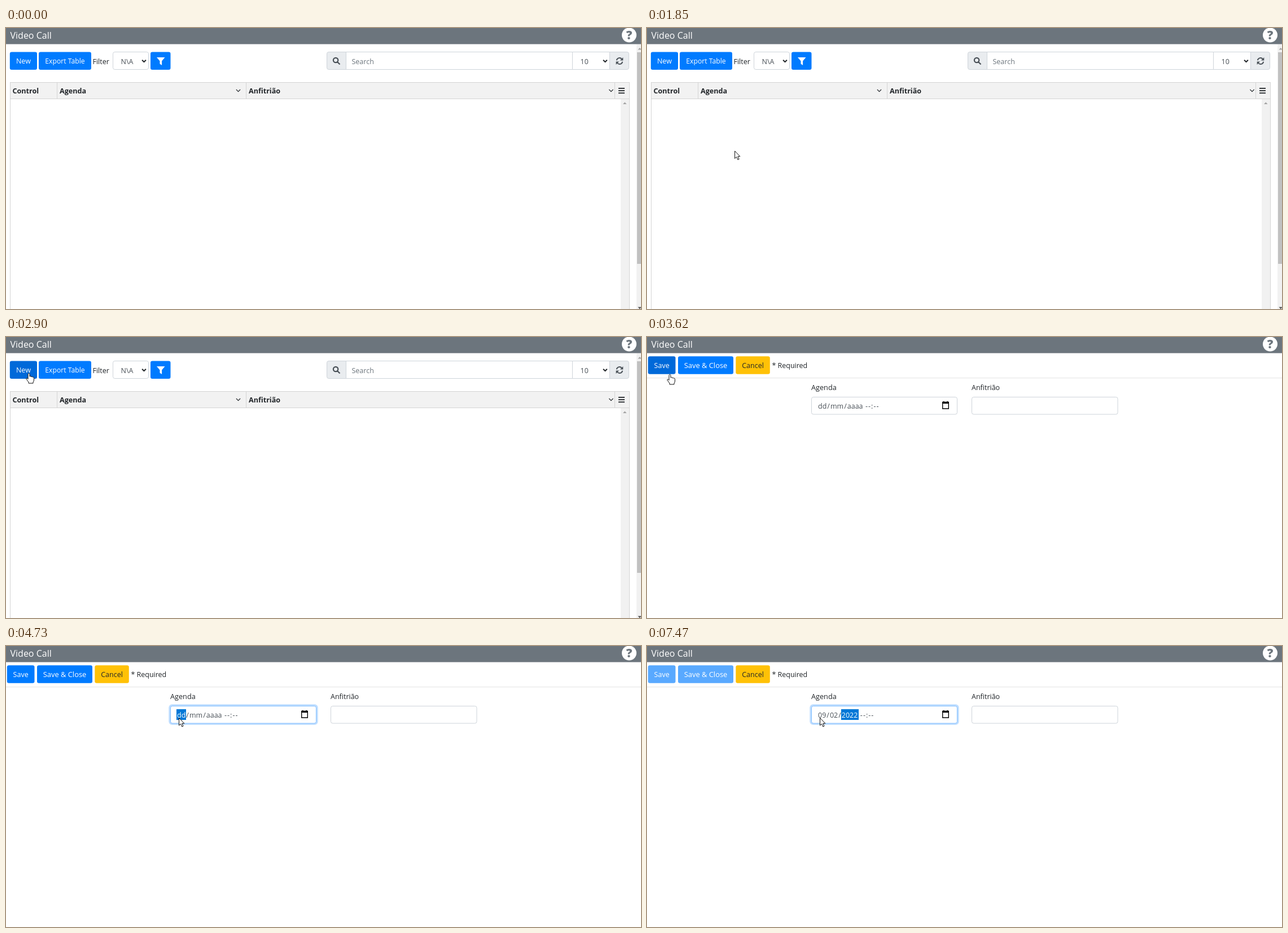
Recreate the animation shown at these times as an HTML page with a canvas. Size 1125 by 498 pixels, loop 8000 ms.

```html
<!DOCTYPE html>
<html lang="en">
<head>
<meta charset="utf-8">
<title>Video Call</title>
<style>
  html, body { margin: 0; width: 100%; height: 100%; overflow: hidden; background: #fff; }
  canvas { display: block; }
</style>
</head>
<body>
<canvas id="stage" width="1125" height="498"></canvas>
<script>
const ctx = document.getElementById('stage').getContext('2d');
const LOOP = 8000, STEP = 70;
const BLUE = [0, 123, 255], BLUE_HOVER = [0, 105, 217], WHITE = [255, 255, 255];
const INK = '#212529', GREY = '#495057', BORDER = '#ced4da', ADDON = '#e9ecef';
const FORM_OPENS = 3030;

const clamp = v => Math.max(0, Math.min(1, v));
const lerp = (a, b, u) => a + (b - a) * u;
const blend = (a, b, u) => a.map((v, i) => lerp(v, b[i], u));
const rgb = color => `rgb(${color.map(Math.round)})`;
const progress = (t, start, end) =>
  clamp(Math.floor((t - start) / STEP + 1e-6) * STEP / (end - start));

function font(size = 12.5, weight = 400) {
  ctx.font = `${weight} ${size}px "Open Sans", "Noto Sans", sans-serif`;
}

function text(str, x, y, color = INK, size, weight) {
  font(size, weight);
  ctx.fillStyle = color;
  ctx.fillText(str, x, y);
}

function rect(x, y, w, h, color) {
  ctx.fillStyle = color;
  ctx.fillRect(x, y, w, h);
}

function box(x, y, w, h, fill, border, radius = 3.3) {
  ctx.beginPath();
  ctx.roundRect(x, y, w, h, radius);
  ctx.fillStyle = fill;
  ctx.fill();
  if (border) {
    ctx.strokeStyle = border;
    ctx.lineWidth = 1;
    ctx.stroke();
  }
}

function path(d, { fill, stroke, width = 1, x = 0, y = 0 }) {
  const shape = new Path2D(d);
  ctx.save();
  ctx.translate(x, y);
  if (fill) { ctx.fillStyle = fill; ctx.fill(shape); }
  if (stroke) { ctx.strokeStyle = stroke; ctx.lineWidth = width; ctx.stroke(shape); }
  ctx.restore();
}

const chevron = (x, y, r, width) =>
  path(`M${-r} ${-r / 2}L0 ${r / 2}L${r} ${-r / 2}`, { x, y, stroke: INK, width });

function button(label, x, y, w, fill, color = '#fff', size) {
  box(x, y, w, 31.6, fill);
  font(size);
  text(label, x + (w - ctx.measureText(label).width) / 2, Math.round(y + 20.8), color, size);
}

function drawHeader() {
  rect(0, 0, 1125, 28.6, '#6c757d');
  text('Video Call', 7.5, 19, '#fff', 16);
  ctx.beginPath();
  ctx.arc(1104, 12.5, 13, 0, 7);
  ctx.fillStyle = '#fff';
  ctx.fill();
  text('?', 1098.8, 20, '#6c757d', 21, 800);
}

function drawToolbar(hover) {
  button('New', 6.8, 42.5, 48.2, rgb(blend(BLUE, BLUE_HOVER, hover)));
  button('Export Table', 58, 42.5, 93, rgb(BLUE), '#fff', 12.2);
  text('Filter', 153.5, 64);
  box(189.5, 42.5, 63, 31, '#fff', BORDER);
  text('N\\A', 203.5, 64, GREY);
  chevron(244.5, 58.5, 3.4, 2);
  box(256, 42.5, 35.5, 31.6, rgb(BLUE));
  path('M267 52h14.5l-5.4 6.6v7.4l-3.6-2.6v-4.8z', { fill: '#fff' });

  box(568.5, 42.5, 535, 31, ADDON, BORDER);
  box(602.5, 42.5, 401, 31, '#fff', BORDER, 0);
  box(1003.5, 42.5, 66, 31, '#fff', BORDER, 0);
  path('M588.3 57a4.2 4.2 0 1 0-8.4 0a4.2 4.2 0 1 0 8.4 0M587 60l4.5 4.5',
    { stroke: GREY, width: 2.2 });
  text('Search', 612.5, 64, '#6c757d');
  text('10', 1017.5, 64, GREY);
  chevron(1061.5, 58.5, 3.4, 2);
  path('M1081.8 57.2A5.2 5.2 0 0 1 1091 55M1092.2 59.8A5.2 5.2 0 0 1 1083 62',
    { stroke: GREY, width: 1.9 });
  path('M1093.3 52v5.4h-5.4zM1080.7 65v-5.4h5.4z', { fill: GREY });
}

function drawTable() {
  const line = '#d4d4d4';
  rect(7, 96, 1098, 30, '#f2f2f2');
  rect(1089, 126, 15, 372, '#f1f1f1');
  rect(7, 96, 1098, 1, line);
  rect(7, 125, 1098, 1, line);
  for (const x of [7, 1104]) rect(x, 96, 1, 402, line);
  for (const x of [90, 425, 1078]) rect(x, 96, 1, 30, line);
  text('Control', 11.5, 116, INK, 12.6, 700);
  text('Agenda', 95, 116, INK, 12.6, 700);
  text('Anfitrião', 430, 116, INK, 12.6, 700);
  chevron(411.5, 110.8, 3.6, 1.1);
  chevron(1072, 110.8, 3.6, 1.1);
  for (let i = 0; i < 3; i++) rect(1085, 106 + i * 4.2, 11, 1.8, INK);
  path('M1093 135l3.3-3.6l3.3 3.6z', { fill: '#a3a3a3' });

  rect(1117, 29, 8, 469, '#f1f1f1');
  rect(1118, 43, 7, 375, '#c1c1c1');
  path('M1119.5 38.5l3.2-3.6l3.2 3.6z', { fill: '#a3a3a3' });
  path('M1119.5 494.5l3.2 3.6l3.2-3.6z', { fill: '#505050' });
}

function dateParts(t) {
  const years = [[7470, '2022'], [7320, '0202'], [7060, '0020'], [6670, '0002'], [0, 'aaaa']];
  return {
    day: t < 5790 ? 'dd' : '09',
    month: t < 6210 ? 'mm' : '02',
    year: years.find(([start]) => t >= start)[1],
    selected: t < 4530 ? '' : t < 5790 ? 'day' : t < 6210 ? 'month' : 'year',
  };
}

function drawDate(t) {
  const { selected, ...parts } = dateParts(t);
  let x = 303;
  const put = (str, active) => {
    font();
    const w = ctx.measureText(str).width;
    if (active) rect(Math.round(x - 1), 112, Math.round(w + 2), 19, '#0078d7');
    text(str, x, 127, active ? '#fff' : GREY);
    x += w + 1;
  };
  for (const name in parts) {
    put(parts[name], name === selected);
    if (name !== 'year') put('/');
  }
  x += 3.5;
  ctx.letterSpacing = '1px';
  put('--:--');
  ctx.letterSpacing = '0px';
}

function drawForm(t, hover) {
  const disabled = t < 5790 ? 0 : t < 5880 ? 0.18 : 0.35;
  const save = blend(BLUE, BLUE_HOVER, hover);
  button('Save', 1.8, 34.2, 48.7, rgb(blend(save, WHITE, disabled)));
  button('Save & Close', 55, 34.2, 98, rgb(blend(BLUE, WHITE, disabled)), '#fff', 12.9);
  button('Cancel', 157.3, 34.2, 60.5, '#ffc107', INK);
  text('*', 221.5, 55);
  text('Required', 231.5, 55);
  rect(0, 72.2, 1125, 0.9, '#e0e0e0');
  text('Agenda', 291, 94, INK, 12.7);
  text('Anfitrião', 575, 94);

  const focus = progress(t, 4460, 4670);
  if (focus) box(288.3, 103.3, 264.4, 36.4, `rgba(0,123,255,${0.25 * focus})`, null, 6);
  box(291.5, 106.5, 258, 30.5, '#fff', rgb(blend([206, 212, 218], [128, 189, 255], focus)));
  box(575.5, 106.5, 258.5, 30.5, '#fff', BORDER);
  drawDate(t);
  path('M523.7 115.5h10.6v11.5h-10.6z', { stroke: '#000', width: 1.4 });
  rect(523, 114.9, 12, 3.2, '#000');
  rect(525, 113.7, 1.5, 2, '#000');
  rect(531.5, 113.7, 1.5, 2, '#000');
}

function cursorAt(t) {
  const glide = (start, end, from, to, power) => {
    const u = progress(t, start, end);
    return [lerp(from[0], to[0], 1 - (1 - u) ** power), lerp(from[1], to[1], u)];
  };
  if (t < 1500) return glide(730, 1500, [618, 485], [235, 299], 1.95);
  if (t < 2410) return glide(1500, 2410, [235, 299], [54, 87], 1.2);
  if (t < 3620) return glide(2410, 2690, [54, 87], [41, 64], 1.5);
  const v = progress(t, 3620, 4390);
  const u = v * v * (3 - 2 * v);
  const bezier = (a, b, c) => a * (1 - u) ** 2 + 2 * b * u * (1 - u) + c * u * u;
  return [bezier(41, 170, 306), bezier(66, 245, 127)];
}

function drawCursor(x, y, hand) {
  const d = hand
    ? 'M-2 1.5Q-.5-1 1 1.5V6Q2.5 4.8 4 6.5Q5.5 5.5 6.5 7.2Q8 6.5 8.5 8.5V12Q8.5 14 7 16V18H-1V16L-5 10.5Q-5.5 8.5-3.5 9L-2 10.5Z'
    : 'M.5.5V13.8L3.5 11L5.8 16L8 15L5.8 10.2H9.8Z';
  path(d, { x, y, fill: '#fff', stroke: '#111' });
}

function draw(t) {
  rect(0, 0, 1125, 498, '#fff');
  drawHeader();
  const [x, y] = cursorAt(t);
  const formOpen = t >= FORM_OPENS;
  const over = formOpen ? t < 3690 : t >= 2410 && y < 75;
  if (formOpen) {
    const entering = progress(t, FORM_OPENS - STEP, FORM_OPENS + STEP);
    drawForm(t, entering * (1 - progress(t, 3620, 3830)));
  } else {
    drawToolbar(over ? progress(t, 2480, 2690) : 0);
    drawTable();
  }
  if (t >= 730) drawCursor(x, y, over);
}

function frame(now) {
  draw(now % LOOP);
  requestAnimationFrame(frame);
}
requestAnimationFrame(frame);
</script>
</body>
</html>
```
